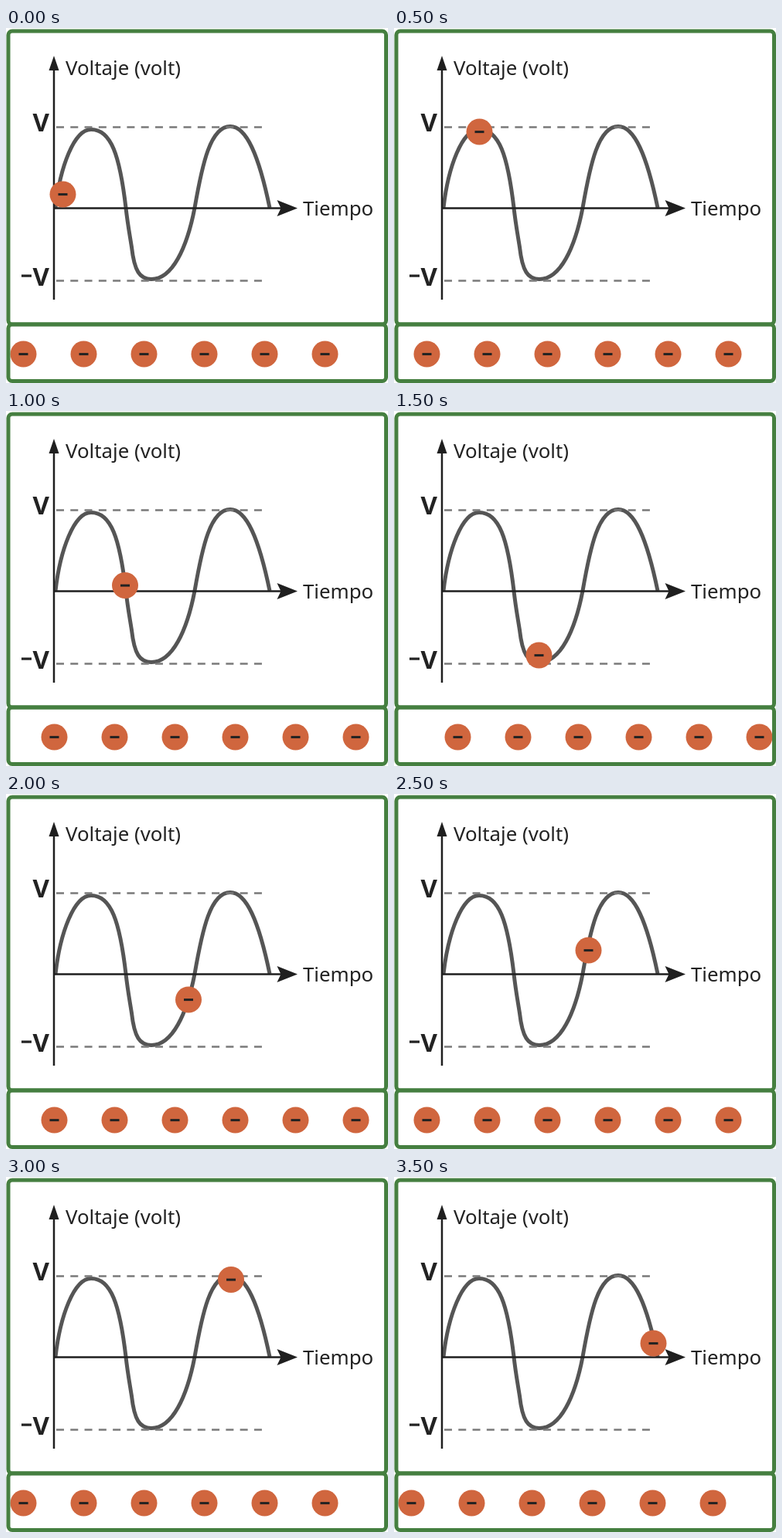
Recreate the animation shown at these times as an HTML page. Size 494x460 px, loop 4 s.

```html
<!DOCTYPE html>
<html lang="es">
<head>
<meta charset="utf-8">
<title>Voltaje alterno</title>
<style>
  html, body { margin: 0; width: 100%; height: 100%; overflow: hidden; background: #fff; }
  svg { display: block; width: 494px; height: 460px; }
  text { font-family: "Noto Sans", "Open Sans", sans-serif; font-size: 25.8px; fill: #222; }
  .level { font-size: 33px; font-weight: 600; }
  .frame { fill: none; stroke: #457f40; stroke-width: 5; }
  .dash { stroke: #7a7a7a; stroke-width: 2.4; stroke-dasharray: 10 8.28; }
  .axis { stroke: #1f1f1f; stroke-width: 2.5; }
  .wave { fill: none; stroke: #555; stroke-width: 5; }
</style>
</head>
<body>
<svg viewBox="0 0 494 460">
  <defs>
    <g id="electron">
      <circle r="17" fill="#d0663e"/>
      <rect x="-6" y="-1.4" width="12" height="3" fill="#222"/>
    </g>
  </defs>

  <path class="wave" d="M64 233C70 180 88 131.500 110 131.500C136 131.500 147 165 155 233
    C157 252 160 268 162.500 284C166 315 173 325.500 188 325.500C215 325.500 234 285 244 233
    C254 175 264.500 127.500 290 127.500C311 127.500 327 165 341 233"/>
  <path class="dash" d="M65 128.500H331M65 327.500H331"/>
  <path class="axis" d="M62 50V352M62 233.500H358"/>
  <path fill="#1f1f1f" d="M62 36L68.500 55H55.500ZM377 233.500L350.500 244L355.500 233.500L350.500 223Z"/>

  <text x="77" y="61">Voltaje (volt)</text>
  <text x="384" y="243">Tiempo</text>
  <text class="level" x="34.500" y="133.500">V</text>
  <text class="level" x="34.500" y="333.500">V</text>
  <rect x="20" y="319.500" width="13" height="3.200" fill="#222"/>

  <use id="rider" href="#electron"/>
  <g id="row"></g>

  <rect class="frame" x="3" y="4" width="488.500" height="380" rx="5"/>
  <rect class="frame" x="3" y="384" width="488.500" height="73.500" rx="5"/>
</svg>
<script>
  const STEP = 500;
  // rider x, rider y, row shift
  const poses = [
    [73.5, 215.5, 0], [110.5, 134.5, 20], [154, 226, 40], [187.5, 316.5, 60],
    [236, 266.5, 40], [251.5, 202.5, 20], [291, 133, 0], [335.5, 215.5, 0]
  ];
  const rider = document.getElementById("rider");
  const row = document.getElementById("row");

  for (let i = 0; i < 6; i++) {
    const e = document.createElementNS("http://www.w3.org/2000/svg", "use");
    e.setAttribute("href", "#electron");
    e.setAttribute("x", 22.5 + 78 * i);
    e.setAttribute("y", 422.5);
    row.append(e);
  }

  function draw(t) {
    const [x, y, shift] = poses[Math.floor(t / STEP) % poses.length];
    rider.setAttribute("transform", `translate(${x} ${y})`);
    row.setAttribute("transform", `translate(${shift} 0)`);
  }

  const start = performance.now();
  function tick(now) {
    draw(Math.max(0, now - start));
    requestAnimationFrame(tick);
  }
  draw(0);
  requestAnimationFrame(tick);
</script>
</body>
</html>
```
